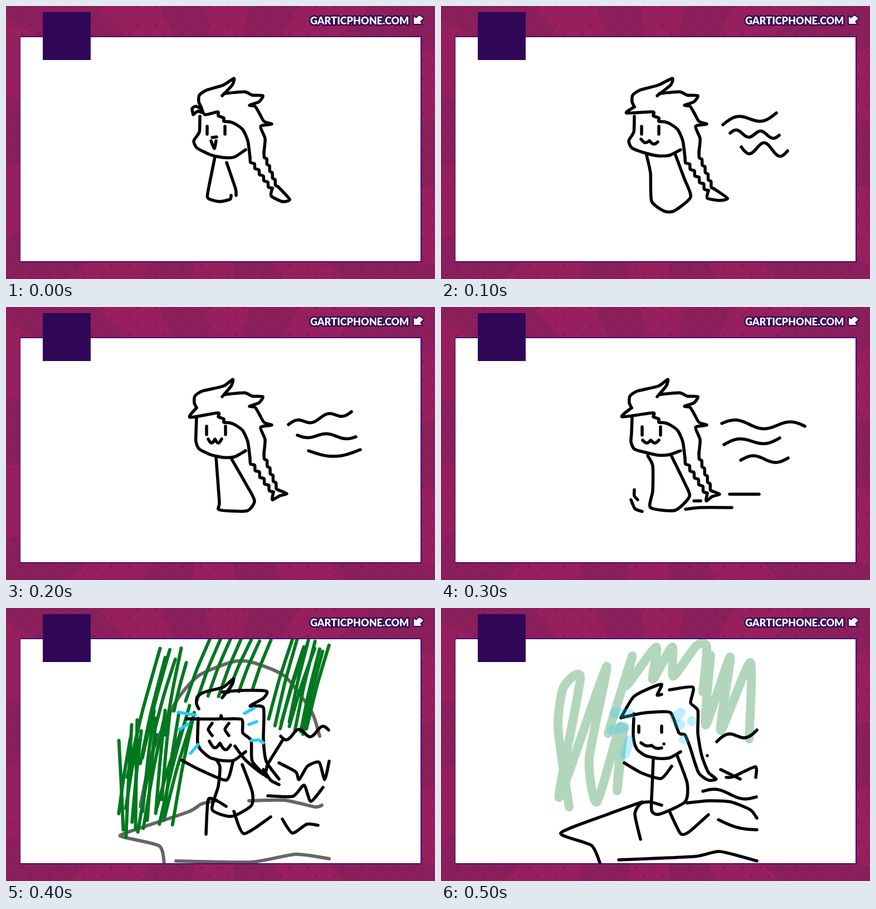
An HTML page with a canvas for the animation above (600 ms loop, 770x490 px).

```html
<!DOCTYPE html>
<html lang="en">
<head>
<meta charset="utf-8">
<title>Running doodle</title>
<style>
html, body { margin: 0; width: 100%; height: 100%; overflow: hidden; background: #961f5c; }
canvas { display: block; }
</style>
</head>
<body>
<canvas id="stage" width="770" height="490"></canvas>
<script>
const ctx = document.getElementById('stage').getContext('2d');
const W = 770, H = 490, STEP = 100;
const CARD = [26, 56, 718, 402];
const INK = '#000', GREEN = '#00781f', GRAY = '#666', CYAN = '#26c9ff';
const mix = (a, b, t) => a + (b - a) * t;

function pen(color = INK, width = 5.5) {
  ctx.strokeStyle = color;
  ctx.lineWidth = width;
}

// Soft curve through x, y pairs; a single pair makes a dot.
function line(...v) {
  const n = v.length / 2;
  const at = i => { const k = 2 * Math.max(0, Math.min(n - 1, i)); return [v[k], v[k + 1]]; };
  ctx.beginPath();
  ctx.moveTo(v[0], v[1]);
  if (n === 1) ctx.lineTo(v[0] + 0.01, v[1]);
  for (let i = 0; i < n - 1; i++) {
    const [a, b, c, d] = [at(i - 1), at(i), at(i + 1), at(i + 2)];
    ctx.bezierCurveTo(
      b[0] + (c[0] - a[0]) / 9, b[1] + (c[1] - a[1]) / 9,
      c[0] - (d[0] - b[0]) / 9, c[1] - (d[1] - b[1]) / 9, ...c);
  }
  ctx.stroke();
}

// Samples f(t) -> [x, y] and strokes the result.
function plot(f, n = 24) {
  const v = [];
  for (let i = 0; i <= n; i++) v.push(...f(i / n));
  line(...v);
}

// Gust of wind: positive height rises first.
const wave = (x0, y0, x1, y1, height, cycles) => plot(t =>
  [mix(x0, x1, t), mix(y0, y1, t) - height * Math.sin(2 * Math.PI * cycles * t)]);

const catMouth = (x, y, w, h, drop = 0) => plot(t =>
  [x + w * t, y + drop * t + h * Math.abs(Math.sin(2 * Math.PI * t))], 16);

function eyes(left, right, y, h, bow = 0) {
  for (const x of [left, right]) line(x, y, x - bow, y + h / 2, x, y + h);
}

// Stepped edge of the braid.
function rope(x0, y0, x1, y1, n) {
  const dx = (x1 - x0) / n, dy = (y1 - y0) / n, v = [x0, y0];
  for (let i = 0; i < n; i++) {
    const x = x0 + dx * i, y = y0 + dy * i;
    v.push(x + dx * 0.1, y + dy * 0.8, x + dx, y + dy);
  }
  line(...v);
}

const crown = (left, tip, top = 130) => line(
  left + 4, 181, left, 172, left + 1, 160, left + 14, 151,
  390, 142, tip, top, tip - 3, top + 12, 388, 161);

const face = (x, jaw, chin) => line(
  x, 198, x - 1, 226, jaw, 242, jaw + 6, 255, 367, chin - 5, 390, chin, 410, chin - 1, 430, 258);

function braid(x, y, tipX, tipY) {
  rope(438, 272, x, y, 5);
  rope(463, 262, x + 10, y - 3, 5);
  line(x, y, x - 2, y + 14, tipX - 13, tipY + 4, tipX, tipY, x + 10, y - 3);
}

function head(left, tip, brimX, brimY) {
  crown(left, tip);
  line(392, 157, 428, 154, 442, 160, 461, 161, 454, 172, 437, 178,
    447, 180, 455, 193, 463, 207, 477, 212, 457, 216, 465, 238, 463, 262);
  line(left + 4, 181, brimX, brimY, 380, 190, 381, 197, 391, 201,
    391, 207, 402, 208, 412, 212, 425, 222, 434, 242, 438, 272);
}

function standing() {
  head(346, 409, 357, 195);
  braid(478, 327, 509, 347);
  line(336, 195, 334, 184, 341, 180, 350, 185, 352, 191, 344, 189, 336, 195);
  face(348, 337, 272);
  eyes(361, 393, 216, 14);
  line(370, 236, 378, 235);
  line(368, 242, 374, 256, 377, 242);
  line(375, 271, 362, 336, 364, 346, 383, 351, 402, 347, 404, 340);
  line(396, 281, 412, 328, 413, 340);
}

function breeze() {
  head(343, 415, 333, 192);
  braid(480, 331, 514, 345);
  face(347, 337, 269);
  eyes(360, 391, 216, 14);
  catMouth(359, 239, 30, 5, 5);
  line(369, 268, 376, 300, 378, 350, 400, 368, 418, 368, 448, 343, 436, 308, 420, 265);
  wave(506, 213, 602, 192, 9, 1);
  wave(519, 228, 607, 232, 6, 2);
  wave(539, 253, 622, 260, -11, 1.5);
}

function leaning() {
  head(338, 407, 330, 198);
  braid(480, 332, 504, 335);
  face(342, 341, 270);
  eyes(360, 394, 214, 15);
  catMouth(363, 237, 24, 7);
  line(377, 270, 383, 350, 383, 364, 432, 366, 446, 348, 432, 320, 405, 273);
  wave(507, 211, 620, 188, 5, 2);
  wave(523, 230, 628, 233, -4, 1.5);
  wave(543, 258, 636, 256, -11, 0.5);
}

function sliding() {
  head(338, 407, 325, 197);
  braid(478, 334, 500, 336);
  face(343, 341, 266);
  eyes(361, 394, 215, 15);
  catMouth(362, 239, 29, 5);
  line(371, 267, 380, 285, 380, 330, 376, 360, 420, 365, 446, 340, 437, 315, 414, 268);
  line(347, 328, 347, 339, 353, 346);
  line(341, 346, 348, 362, 361, 367);
  line(454, 348, 466, 348);
  line(439, 363, 465, 360, 522, 360);
  line(518, 336, 571, 336);
  wave(504, 209, 653, 214, 7, 1.5);
  wave(508, 247, 608, 235, 7, 1);
  wave(538, 275, 623, 271, 7, 1);
}

function seeded(seed) {
  return () => (seed = (seed * 16807) % 2147483647) / 2147483647 - 0.5;
}

// Loose blades from the edge a-b down to the edge c-d.
function hatch(n, [ax, ay], [bx, by], [cx, cy], [dx, dy], loose) {
  const rnd = seeded(n * 977);
  for (let i = 0; i < n; i++) {
    const t = i / (n - 1);
    const x = mix(ax, bx, t) + rnd() * loose / 3, y = mix(ay, by, t) + rnd() * loose;
    const u = mix(cx, dx, t) + rnd() * loose / 2, v = mix(cy, dy, t) + rnd() * loose;
    line(x, y, mix(x, u, 0.55), mix(y, v, 0.5), u, v);
  }
}

function grassRun() {
  pen(GRAY, 6);
  line(241, 356, 262, 260, 305, 168, 345, 122, 405, 97, 440, 97, 500, 122, 548, 185, 563, 230);
  line(436, 346, 500, 345, 555, 357, 567, 354);
  line(378, 345, 350, 352, 327, 366, 214, 404, 210, 411, 275, 427, 284, 459);
  line(305, 454, 440, 456, 520, 442, 580, 450);
  pen(GREEN, 6);
  hatch(17, [210, 225], [345, 190], [200, 385], [302, 360], 60);
  hatch(6, [282, 88], [326, 85], [220, 300], [300, 195], 36);
  hatch(7, [367, 56], [474, 56], [322, 165], [440, 150], 10);
  hatch(10, [520, 56], [577, 75], [474, 210], [540, 220], 22);

  pen();
  crown(342, 408, 127);
  line(388, 151, 420, 148, 467, 149, 462, 162, 438, 176, 462, 179, 462, 235, 467, 275, 490, 307);
  line(324, 199, 383, 199, 386, 193, 388, 199, 423, 200, 425, 224, 440, 238, 442, 275, 468, 303);
  face(345, 344, 274);
  eyes(370, 400, 207, 22, 7);
  catMouth(365, 239, 38, 10, 7);
  line(377, 272, 384, 285, 381, 320, 370, 362, 405, 374, 440, 355, 442, 330, 424, 281);
  line(315, 273, 345, 289, 395, 309, 407, 277);
  line(411, 248, 430, 273, 463, 299, 470, 280, 496, 238);
  line(395, 356, 380, 347, 363, 344, 359, 406);
  line(409, 365, 427, 405, 475, 375);
  line(462, 290, 475, 309, 490, 317);
  wave(493, 230, 579, 219, -8, 2);
  line(490, 278, 520, 294, 526, 308, 541, 284, 562, 277, 572, 308, 580, 275);
  line(470, 337, 515, 338, 535, 318, 547, 347, 569, 322);
  line(496, 379, 514, 404, 540, 388, 560, 390);

  pen(CYAN);
  line(309, 187, 340, 192);
  line(311, 218, 327, 208);
  line(331, 261, 345, 245);
  line(428, 189, 445, 180);
  line(436, 209, 450, 204);
  line(440, 238, 453, 237, 462, 242);
}

function riding() {
  pen('#b2d6bc', 16);
  line(230, 357, 210, 215, 220, 142, 250, 127, 212, 340, 297, 105, 266, 270, 280, 348, 322, 212, 316, 328, 328, 215);
  line(300, 225, 343, 87, 332, 140, 386, 70, 380, 128, 415, 70, 417, 122, 458, 68, 477, 70, 470, 150);
  line(484, 85, 475, 210, 519, 88, 502, 220, 555, 98, 553, 235);

  pen();
  line(323, 197, 345, 160, 370, 146, 396, 137, 388, 156, 396, 155);
  line(410, 147, 452, 142, 448, 170, 461, 184, 461, 225, 468, 265, 480, 295, 494, 307,
    480, 309, 462, 295, 447, 250, 438, 228, 427, 224, 412, 188, 381, 187, 360, 189, 323, 197);
  line(346, 190);
  face(346, 347, 270);
  eyes(355, 396, 212, 11);
  catMouth(359, 242, 37, 3, 9);
  line(400, 244);
  line(478, 265);
  line(381, 272, 379, 320, 378, 363, 392, 370, 438, 348, 442, 315, 424, 265);
  line(329, 278, 360, 296, 395, 306, 414, 284);
  line(396, 354, 375, 348, 358, 351, 348, 370, 358, 415);
  line(411, 367, 430, 405, 445, 402, 480, 371);
  line(361, 348, 300, 370, 215, 404, 270, 426, 286, 460);
  line(441, 350, 480, 346, 520, 348, 555, 362, 567, 377);
  line(319, 452, 455, 446, 500, 437, 567, 454);
  line(502, 290, 537, 307);
  line(512, 304, 524, 303, 564, 285, 565, 304);
  wave(495, 240, 567, 219, 8, 1);
  wave(470, 329, 566, 339, 6, 1);
  wave(498, 380, 567, 398, -5, 0.5);

  pen('rgba(38,201,255,.3)', 18);
  line(311, 188, 338, 190);
  line(307, 219, 330, 213);
  line(330, 262, 338, 238);
  line(420, 198, 430, 188);
  line(429, 209);
  line(450, 203);
  line(436, 236);
}

function backdrop() {
  const RAYS = 10, turn = 2 * Math.PI / RAYS;
  ctx.fillStyle = '#981f5e';
  ctx.fillRect(0, 0, W, H);
  ctx.fillStyle = '#8a1f5b';
  for (let i = 0; i < RAYS; i++) {
    const a = (i - 1 / 6) * turn;
    ctx.beginPath();
    ctx.moveTo(W / 2, H / 2);
    ctx.arc(W / 2, H / 2, 500, a, a + turn / 2);
    ctx.fill();
  }
  ctx.fillStyle = '#771b57';
  for (let row = 0; row < 32; row++)
    for (let x = row % 2 ? 29 : 13; x < W; x += 32) {
      ctx.beginPath();
      ctx.arc(x, 2 + row * 16, 2, 0, 7);
      ctx.fill();
    }
  ctx.fillStyle = '#430b78';
  ctx.fillRect(25, 54, 721, 406);
  ctx.fillStyle = '#fff';
  ctx.fillRect(...CARD);
}

function header() {
  ctx.fillStyle = '#300657';
  ctx.fillRect(66, 11, 86, 86);
  ctx.font = '900 18px Lato, sans-serif';
  pen('#300657', 5);
  ctx.fillStyle = '#fff';
  ctx.strokeText('GARTICPHONE.COM', 546, 33);
  ctx.fillText('GARTICPHONE.COM', 546, 33);
  const arrow = new Path2D('M732 19L736 22L742 17L749 22L743 28L746 32H732Z');
  pen('#300657', 4);
  ctx.stroke(arrow);
  ctx.fill(arrow);
}

const poses = [standing, breeze, leaning, sliding, grassRun, riding];
const start = performance.now();

function draw() {
  const t = Math.max(0, performance.now() - start);
  ctx.lineCap = ctx.lineJoin = 'round';
  backdrop();
  ctx.save();
  ctx.beginPath();
  ctx.rect(...CARD);
  ctx.clip();
  pen();
  poses[Math.floor(t / STEP) % poses.length]();
  ctx.restore();
  header();
  requestAnimationFrame(draw);
}
draw();
</script>
</body>
</html>
```
